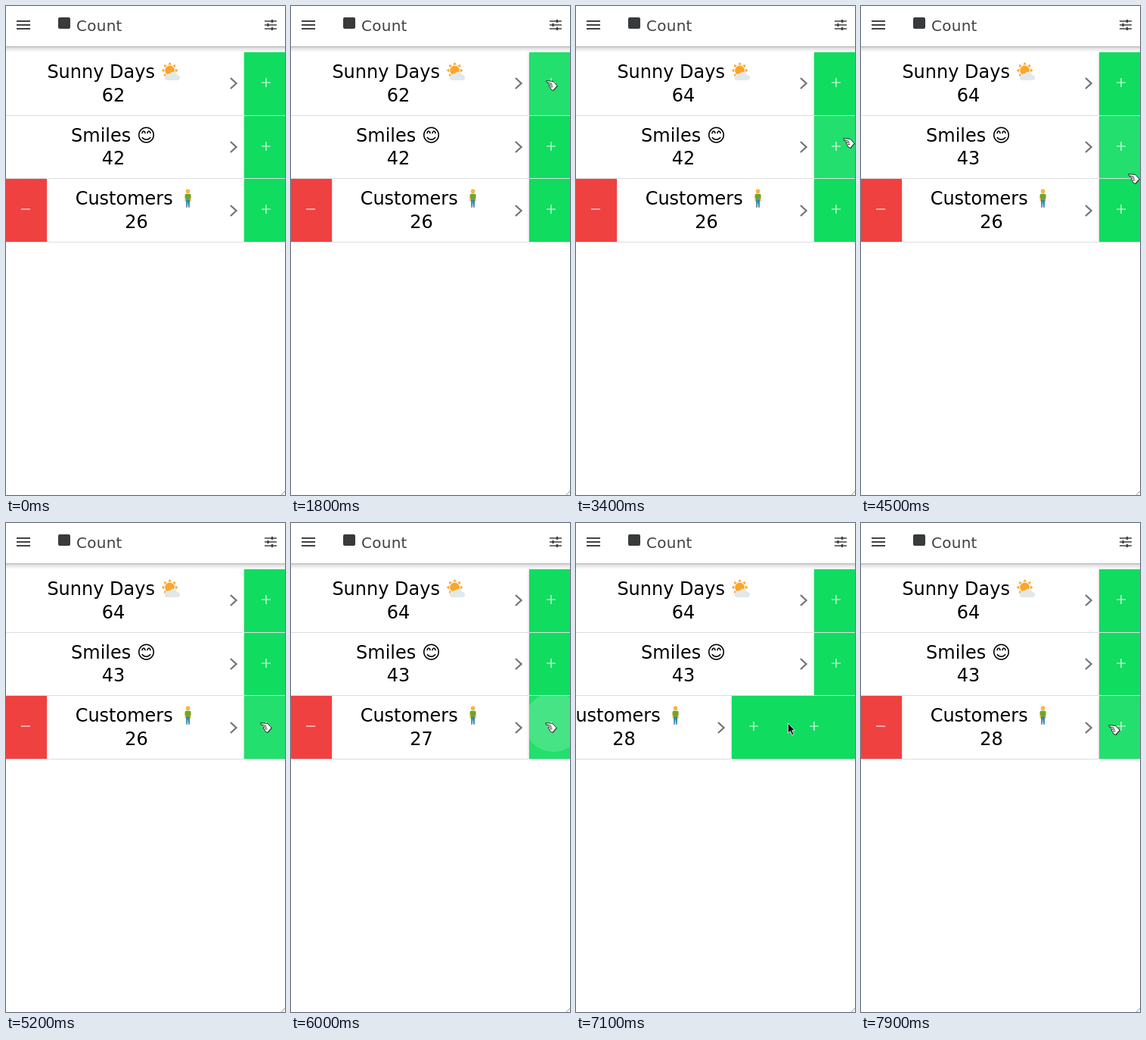
Recreate the animation shown at these times as an HTML page. Size 369 by 645 pixels, loop 8000 ms.

```html
<!DOCTYPE html>
<html lang="en">
<head>
<meta charset="utf-8">
<title>Count</title>
<style>
  html, body { margin: 0; width: 100%; height: 100%; overflow: hidden; background: #fff; }
  body { position: relative; font: 24px/28px "DejaVu Sans", sans-serif; color: #000; }
  svg, h1, .row, .body, .text, .button, .option, .ripple { position: absolute; }
  svg { overflow: visible; }
  h1 { left: 93px; top: 14px; margin: 0; font: 20px/24px "DejaVu Sans", sans-serif; letter-spacing: .25px; color: #424242; }
  .shade { position: absolute; top: 53px; width: 369px; height: 8px;
    background: linear-gradient(rgba(0,0,0,.27), rgba(0,0,0,.11) 35%, transparent); }
  .line { fill: none; stroke: #424242; }
  .row { width: 369px; height: 82.5px; border-bottom: 1px solid #dedede; overflow: hidden; }
  .body { left: 0; top: 0; width: 369px; height: 100%; }
  .text { width: 284px; text-align: center; white-space: pre; }
  .art { display: inline-block; position: relative; width: 25px; height: 0; }
  .art svg { left: 0; top: -22px; width: 25px; height: 28px; }
  .button { top: 0; width: 54px; height: 100%; overflow: hidden;
    box-shadow: 0 3px 1px -2px rgba(0,0,0,.2), 0 2px 2px rgba(0,0,0,.14), 0 1px 5px rgba(0,0,0,.12); }
  .add { left: 315px; background: #10dc60; }
  .add.hover { background: #23df6d; }
  .remove { left: 0; background: #f04141; }
  .option { top: 0; right: 0; height: 100%; overflow: hidden; background: #10dc60; }
  .sign { top: 34px; width: 12px; height: 12px; fill: none; stroke: #fff; stroke-opacity: .92; stroke-width: 1.2; }
  .add .sign { left: 23px; }
  .remove .sign { left: 20px; }
  .option .sign { left: calc(50% - 6px); }
  .chevron { left: 296.8px; width: 8px; height: 14px; fill: none; stroke: #737373; stroke-width: 2.2; }
  .ripple { width: 78px; height: 78px; border-radius: 50%; background: #fff; opacity: .16; }
</style>
</head>
<body>
<svg width="369" height="645">
  <path class="line" stroke-width="2" d="M14 20h18M14 25h18M14 30h18"/>
  <rect x="69" y="15" width="16" height="15" rx="2" fill="#383a3c"/>
  <path class="line" stroke-width="1.4" d="M342 20h16M342 25h16M342 30h16"/>
  <path class="line" stroke-width="2.4" d="M352 18v4M346.5 23v4M352 28v4"/>
  <path fill="none" stroke="#999" d="M363 646l7-7"/>
</svg>
<h1>Count</h1>
<div class="shade"></div>
<div id="rows"></div>
<svg id="cursor" width="16" height="16">
  <path id="arrow" d="M.4 0V13.2l3-2.8 2.4 5.4 2.2-1-2.4-5.2h3.8z" stroke="#fff" stroke-width=".8"/>
  <g id="hand" stroke="#000" stroke-width=".8" stroke-linejoin="round">
    <path fill="#fff" d="M.8.7L9.8 1.4 15.5 7.5 10.3 13.7 7 12 5.8 9.6 4.4 8 5 6.2 3.6 4.8 1.2 2.8z"/>
    <path fill="none" d="M2 2.8L8 4.5M5 6L9 6.4M6 8.6L9.5 8.6M10 13L15 7.2"/>
  </g>
</svg>
<script>
const LOOP = 8000, STEP = 100, WIDTH = 369, TOP = 61, PITCH = 83.5;
const $ = id => document.getElementById(id);
const art = shapes => `<span class="art"><svg viewBox="0 0 25 28">${shapes}</svg></span>`;
const sign = d => `<svg class="sign"><path d="${d}"/></svg>`;
const plus = sign('M0 6h12M6 0v12'), minus = sign('M0 6h12');

const rays = Array.from({ length: 8 }, (_, i) =>
  `<path d="M-2.4-7.4L0-11 2.4-7.4z" transform="rotate(${i * 45})"/>`).join('');
const sun = art(`<g transform="translate(11.6 12)" fill="#fca62b"><circle r="6.4"/>${rays}</g>
  <path fill="#e2e8ea" d="M8.5 25a3.6 3.6 0 0 1-.2-7.2q1.2-2.4 3.6-1.6a5 5 0 0 1 9.2 1.8 3.5 3.5 0 0 1 .9 7z"/>`);
const person = art(`<path fill="#f5b041" d="M8.6 12h8v5.5h-8z"/>
  <path fill="#6fa52f" d="M8.6 9.5q0-1.8 1.8-1.8h4.4q1.8 0 1.8 1.8v4h-1.4v3H10v-3H8.6z"/>
  <path fill="#2f87b5" d="M10 16h5.2l-.4 8.6h-1.6l-.6-6.6-.6 6.6h-1.6z"/>
  <circle cx="12.6" cy="4.4" r="2.8" fill="#f8b63c"/>
  <path fill="#555" d="M10 24.4h2.2v1.2H10zM13 24.4h2.2v1.2H13z"/>`);

const rows = [
  { label: 'Sunny Days ' + sun, count: 62 },
  { label: 'Smiles \u{1F60A}', count: 42 },
  { label: 'Customers ' + person, count: 26, indent: 30.5, slides: true }
];
const clicks = [[2200, 0], [2500, 0], [3700, 1], [5400, 2]];
const grab = [6000, 2];
const swiped = [6800, 2];

// pointer moves: start, end, x, y
const entry = [17, 90];
const moves = [
  [500, 1800, 337, 98], [2600, 3400, 353, 174], [3800, 4500, 353, 221], [4500, 5100, 336, 263],
  [6100, 6700, 262, 263], [7000, 7600, 342, 266], [7700, 7900, 327, 266]
];

$('rows').innerHTML = rows.map((r, i) => `<div class="row" style="top:${TOP + PITCH * i}px">
  <div class="body" id="body${i}">
    ${r.slides ? `<div class="button remove">${minus}</div>` : ''}
    <div class="text" style="left:${r.indent || 0}px;top:12px">${r.label}</div>
    <div class="text" style="left:${r.indent || 0}px;top:42.6px" id="count${i}"></div>
    <svg class="chevron" style="top:${34 + i / 2}px"><path d="M0 0l7.6 7-7.6 7"/></svg>
    <div class="button add" id="add${i}">${plus}<div class="ripple" id="ripple${i}"></div></div>
  </div>
  ${r.slides ? `<div class="option" id="option">${plus}</div>` : ''}
</div>`).join('');

const progress = (t, from, to) => Math.min(1, Math.max(0, (t - from) / (to - from)));

function pointer(t) {
  return moves.reduce(([x, y], [from, to, nx, ny]) => {
    const f = 1 - (1 - progress(t, from, to)) ** 1.4;
    return [x + (nx - x) * f, y + (ny - y) * f];
  }, entry).map(Math.round);
}

// the row accelerates out, then eases back
const slide = t => Math.round(WIDTH * (t < 6900
  ? progress(t, 6100, 6800) ** 3
  : (1 - progress(t, 6900, 7500)) ** 3));

const show = (id, on) => { $(id).style.visibility = on ? 'visible' : 'hidden'; };

function draw(t) {
  const [x, y] = pointer(t), shift = slide(t);
  let over = false;

  rows.forEach((r, i) => {
    const dx = r.slides ? shift : 0, top = TOP + PITCH * i;
    const hover = y >= top && y < top + PITCH && x >= 315 - dx && x < WIDTH - dx;
    over = over || hover;
    $('add' + i).classList.toggle('hover', hover);
    $('body' + i).style.left = -dx + 'px';
    $('count' + i).textContent = r.count +
      [...clicks, swiped].filter(([at, row]) => row === i && at <= t).length;

    const ripple = $('ripple' + i).style;
    show('ripple' + i, [...clicks, grab].some(([at, row]) => row === i && t >= at && t < at + STEP));
    ripple.left = x + 11 - 39 - 315 + 'px';
    ripple.top = y - 39 - top + 'px';
  });

  $('option').style.width = shift + 'px';
  show('arrow', t >= 500 && !over);
  show('hand', over);
  $('cursor').style.left = x + 'px';
  $('cursor').style.top = y + 'px';
}

const start = performance.now();
function tick(now) {
  const t = Math.max(0, now - start) % LOOP;
  draw(Math.floor(t / STEP) * STEP);
  requestAnimationFrame(tick);
}
draw(0);
requestAnimationFrame(tick);
</script>
</body>
</html>
```
